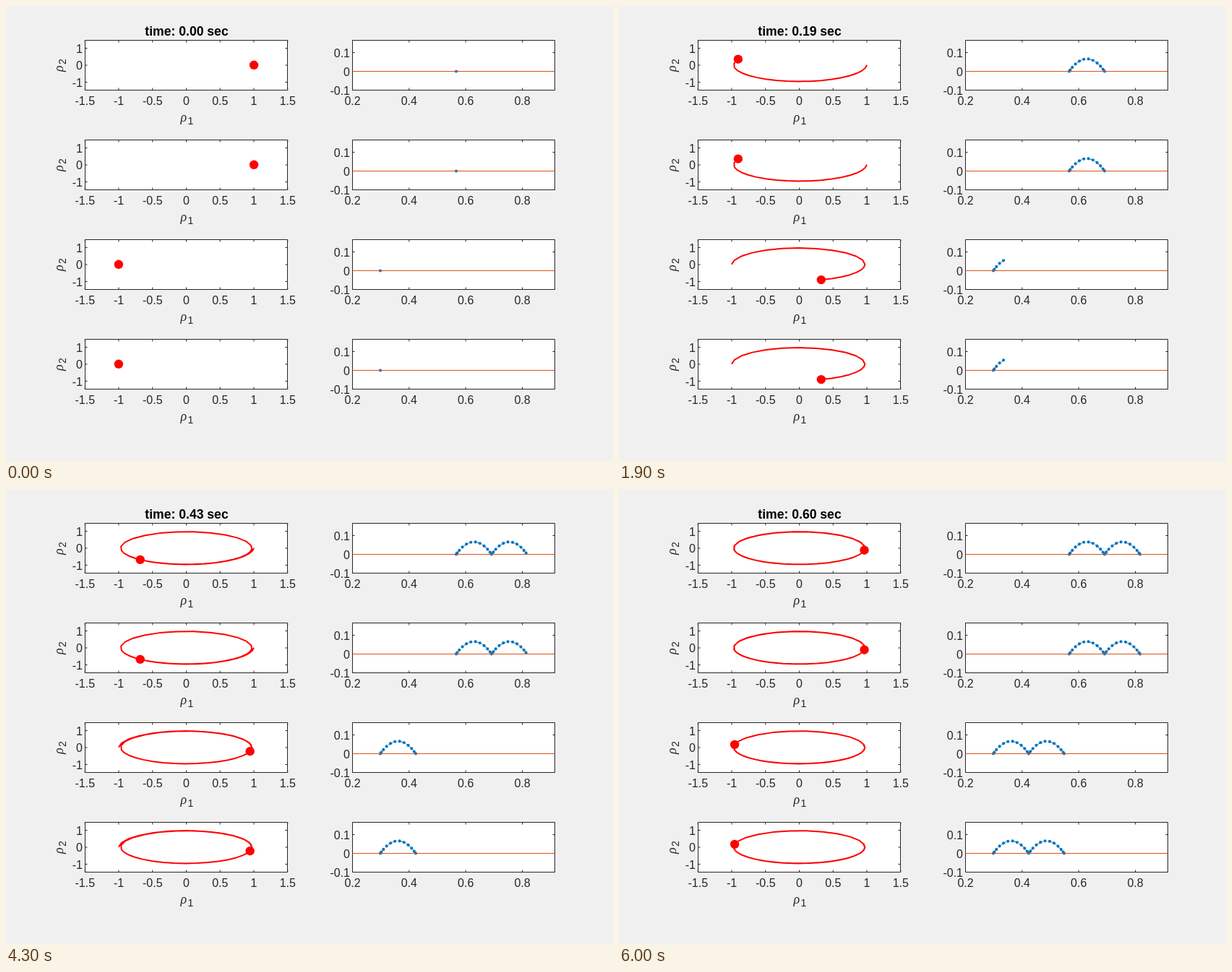
Animation of 840x630 px, one loop 6.1 s. Source, as an HTML page:

```html
<!DOCTYPE html>
<html lang="en">
<head>
<meta charset="utf-8">
<title>Phase oscillators</title>
<style>
  html, body { margin: 0; width: 100%; height: 100%; overflow: hidden; background: #f0f0f0; }
  svg { display: block; width: 840px; height: 630px; }
  text { font: 16px "Liberation Sans", Arial, sans-serif; fill: #262626; }
  .mid { text-anchor: middle; }
  .end { text-anchor: end; }
  .title { font-size: 17.6px; font-weight: bold; fill: #000; }
  .rho { font: italic 18px "Liberation Serif", "Times New Roman", serif; }
  .sub { font-size: 14px; }
  path { fill: none; stroke-linejoin: round; }
  .axis { stroke: #262626; }
  .trail { stroke: red; stroke-width: 2; }
  .ball { fill: red; }
  .hop { stroke: #0072bd; stroke-width: 1; stroke-dasharray: 8 3 2 3; }
  .dots { stroke: #0072bd; stroke-width: 4.2; stroke-linecap: round; }
  .ground { stroke: #d95319; }
</style>
</head>
<body>
<svg id="stage" viewBox="0 0 840 630"></svg>
<script>
const NS = 'http://www.w3.org/2000/svg';
const stage = document.getElementById('stage');
const FRAMES = 61, STEP = 100, TRAIL = 50, ROW = 138;
const SLOW = 10.07, FAST = 15;

function add(parent, tag, attrs, text) {
  const el = document.createElementNS(NS, tag);
  for (const k in attrs) el.setAttribute(k, attrs[k]);
  if (text !== undefined) el.textContent = text;
  parent.appendChild(el);
  return el;
}

// Box with inward ticks on all four sides, plus tick labels.
function axes(g, left, xTicks, yTicks) {
  const right = left + 280, top = 47.5, bottom = 116.5;
  add(g, 'rect', { x: left, y: top, width: 280, height: 69, fill: '#fff' });
  let d = `M${left} ${top}H${right}V${bottom}H${left}Z`;
  for (const [x, label] of xTicks) {
    d += `M${x} ${bottom}v-3M${x} ${top}v3`;
    add(g, 'text', { x, y: 137, class: 'mid' }, label);
  }
  for (const [y, label] of yTicks) {
    d += `M${left} ${y}h3M${right} ${y}h-3`;
    add(g, 'text', { x: left - 3.5, y: y + 6, class: 'end' }, label);
  }
  add(g, 'path', { d, class: 'axis' });
}

function rho(g, sub, transform) {
  const label = add(g, 'g', { transform });
  add(label, 'text', { x: 0, y: 0, class: 'rho' }, 'ρ');
  add(label, 'text', { x: 10, y: 4.5, class: 'sub' }, sub);
}

// Clockwise angle per step: slow through the lower half, fast through the upper.
function phases(start) {
  const list = [start];
  for (let p = start; list.length < FRAMES; list.push(p)) {
    const s = p % 360;
    if (s < 180) p += s + SLOW > 180 ? FAST : SLOW;
    else p += s + FAST > 360 ? (SLOW + FAST) / 2 : FAST;
  }
  return list;
}

function orbit(p, k) {
  const a = p * Math.PI / 180, r = 0.97 + 0.03 * Math.exp(-k / 3);
  return [249.5 + 93.6 * r * Math.cos(a), 81.8 + 23.3 * r * Math.sin(a)];
}

// The foot swings forward along a parabola during part of the slow half.
function foot(p, x0) {
  const swing = Math.min(180, Math.max(0, (p % 360 - 27.3) * 1.5));
  const u = (1 - Math.cos(swing * Math.PI / 180)) / 2;
  return [x0 + 49 * (Math.floor(p / 360) + u), 90.5 - 69.2 * u * (1 - u)];
}

const pt = ([x, y]) => x.toFixed(2) + ' ' + y.toFixed(2);
const line = pts => 'M' + pts.map(pt).join('L');

function makeRow(i) {
  const g = add(stage, 'g', { transform: `translate(0 ${i * ROW})` });
  axes(g, 109.5,
    [-1.5, -1, -0.5, 0, 0.5, 1, 1.5].map(v => [249.5 + v * 93.5, v]),
    [1, 0, -1].map(v => [82 - v * 23.5, v]));
  axes(g, 479.5,
    [0.2, 0.4, 0.6, 0.8].map(v => [479.5 + (v - 0.2) * 391.7, v]),
    [[64.5, 0.1], [90.5, 0], [116.5, -0.1]]);
  rho(g, '1', 'translate(241.5 159.5)');
  rho(g, '2', 'translate(78.5 91) rotate(-90)');

  const start = i < 2 ? 0 : 180;
  const x0 = i < 2 ? 623 : 518;
  const angles = phases(start);
  const base = foot(start, 0)[0];
  return {
    path: angles.map(orbit),
    steps: angles.map(p => foot(p, x0 - base)),
    trail: add(g, 'path', { class: 'trail' }),
    ball: add(g, 'circle', { class: 'ball', r: 6.2 }),
    hop: add(g, 'path', { class: 'hop' }),
    dots: add(g, 'path', { class: 'dots' }),
    ground: add(g, 'path', { class: 'ground', d: 'M479.5 90.5H759.5' })
  };
}

const rows = [0, 1, 2, 3].map(makeRow);
const title = add(stage, 'text', { x: 250, y: 41, class: 'mid title' });

function draw(n) {
  title.textContent = `time: ${(n / 100).toFixed(2)} sec`;
  for (const r of rows) {
    const [cx, cy] = r.path[n];
    const steps = r.steps.slice(0, n + 1);
    r.trail.setAttribute('d', line(r.path.slice(Math.max(0, n + 1 - TRAIL), n + 1)));
    r.ball.setAttribute('cx', cx);
    r.ball.setAttribute('cy', cy);
    r.hop.setAttribute('d', line(steps));
    r.dots.setAttribute('d', steps.map(s => `M${pt(s)}h0`).join(''));
  }
}

let shown = -1;
const begin = performance.now();
function tick() {
  const n = Math.floor((performance.now() - begin) / STEP) % FRAMES;
  if (n !== shown) draw(shown = n);
  requestAnimationFrame(tick);
}
tick();
</script>
</body>
</html>
```
